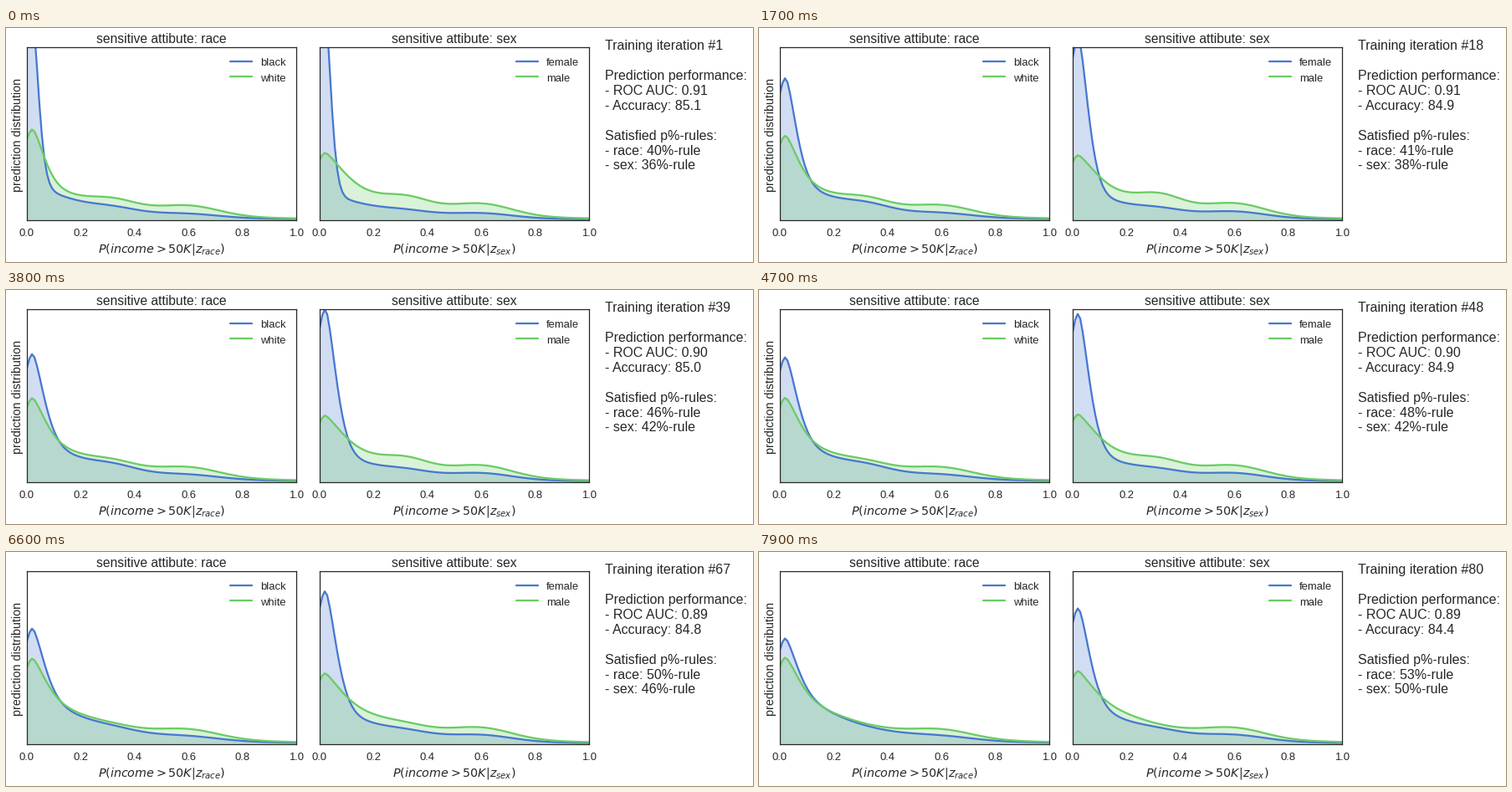
These frames come from a looping animation (893 by 280 pixels, 8000 ms). A matplotlib script:

```python
import numpy as np
import matplotlib.pyplot as plt
from matplotlib.animation import FuncAnimation
from matplotlib.lines import Line2D

W, H, DPI = 893, 280, 72
FRAMES, INTERVAL = 80, 100
INK, BLUE, GREEN = "#262626", "#4878CF", "#6ACC65"
LINE = 2.275
AX_W, AX_H, AX_TOP = 322, 207, 23
PEAK = 7  # offset of the density peak, in pixels

plt.rcParams.update({
    "font.family": "Liberation Sans",
    "mathtext.fontset": "dejavusans",
    "text.color": INK,
    "axes.edgecolor": INK,
    "axes.linewidth": 1.25,
    "lines.solid_capstyle": "round",
})

XS = np.linspace(0, AX_W, 108)


def bump(center, width):
    return np.exp(-((XS - center) / width) ** 2 / 2)


class Group:
    """A density that moves from an early to a settled to a late shape.

    Each shape is (head, head width, base, shoulder, far bump) in pixels.
    """

    def __init__(self, name, color, decay, lateness, early, settled, late):
        self.name, self.color = name, color
        self.decay, self.lateness = decay, lateness
        self.shapes = np.array([early, settled, late])

    def heights(self, it):
        start = np.exp(-(it - 1) / 10)
        end = ((it - 1) / (FRAMES - 1)) ** self.lateness
        head, width, base, shoulder, far = [start, 1 - start - end, end] @ self.shapes
        past = np.maximum(XS - PEAK, 0)
        rise = np.exp(-(np.maximum(PEAK - XS, 0) / 14.5) ** 2 / 2)
        near = head * np.exp(-(past / width) ** 1.6) + base * np.exp(-past / self.decay)
        return near * rise + shoulder * bump(105, 27) + far * bump(195, 36) + 0.8


RACE = [
    Group("black", BLUE, 75, 3, (195, 10, 45, 4, 3.5), (98, 19, 56, 7, 4), (49, 20, 77, 0, 3.5)),
    Group("white", GREEN, 88, 1.5, (58, 19, 50, 9, 11), (42, 20.5, 56, 10, 11), (33, 22, 70, 0, 9)),
]
SEX = [
    Group("female", BLUE, 75, 3, (215, 9.3, 34, 3, 5), (171, 17.5, 40, 4.5, 7), (104, 18.5, 58, 3, 6)),
    Group("male", GREEN, 88, 1.5, (27, 32, 53, 11, 13), (26, 31, 49, 17, 14), (18, 25, 69, 0, 11)),
]

STAT_KEYS = [1, 10, 26, 39, 57, 67, 80]
ACCURACY = [85.1, 84.9, 84.9, 85.0, 84.8, 84.8, 84.4]
RACE_RULE = [40, 40, 42, 46, 49, 50, 53]
SEX_RULE = [36, 36, 39, 42, 43, 46, 50]


def stat(values, it):
    return np.interp(it, STAT_KEYS, values)


fig = plt.figure(figsize=(W / DPI, H / DPI), dpi=DPI, facecolor="white")


def label(x, y, s, size, **kw):
    """Text with its baseline at pixel (x, y), y counted from the top."""
    return fig.text(x / W, 1 - y / H, s, fontsize=size, va="baseline", **kw)


def legend_row(x, row, name, color):
    y = 1 - (40 + 18 * row) / H
    fig.add_artist(Line2D([x / W, (x + 26) / W], [y, y], color=color, lw=LINE))
    label(x + 36.4, 45 + 19 * row, name, 13)


curves = []


def panel(left, name, legend_x, groups):
    bottom = H - AX_TOP - AX_H
    ax = fig.add_axes([left / W, bottom / H, AX_W / W, AX_H / H])
    ax.set(xlim=(0, AX_W), ylim=(0, AX_H), xticks=[], yticks=[])
    mid = left + AX_W / 2
    label(mid, 18, f"sensitive attibute: {name}", 15.6, ha="center")
    label(mid, 269, rf"$P(income>50K|z_{{{name}}})$", 14.3, ha="center")
    for k in range(6):
        label(left + AX_W * k / 5, 249, f"{k / 5:.1f}", 13, ha="center")
    for row, group in enumerate(groups):
        color = group.color
        area, = ax.fill([0, 1, 1], [0, 0, 1], color=color, alpha=0.25, lw=0, zorder=1)
        line, = ax.plot([], [], color=color, lw=LINE, zorder=2)
        curves.append((group, area, line))
        legend_row(legend_x, row, group.name, color)


panel(25, "race", 267.5, RACE)
panel(375, "sex", 609.5, SEX)
label(18, 128, "prediction distribution", 14.3, ha="center",
      rotation=90, rotation_mode="anchor")
notes = [label(716, 26 + 17.93 * k, "", 16) for k in range(9)]


def update(frame):
    it = frame + 1
    for group, area, line in curves:
        ys = group.heights(it)
        line.set_data(XS, ys)
        area.set_xy(np.column_stack([np.r_[0, XS, AX_W], np.r_[0, ys, 0]]))
    auc = 0.911 - 0.022 * frame / (FRAMES - 1)
    lines = [
        f"Training iteration #{it}",
        "",
        "Prediction performance:",
        f"- ROC AUC: {auc:.2f}",
        f"- Accuracy: {stat(ACCURACY, it):.1f}",
        "",
        "Satisfied p%-rules:",
        f"- race: {stat(RACE_RULE, it):.0f}%-rule",
        f"- sex: {stat(SEX_RULE, it):.0f}%-rule",
    ]
    for note, s in zip(notes, lines):
        note.set_text(s)
    return notes


anim = FuncAnimation(fig, update, frames=FRAMES, interval=INTERVAL,
                     repeat=True, repeat_delay=0, blit=False)
plt.show()
```
